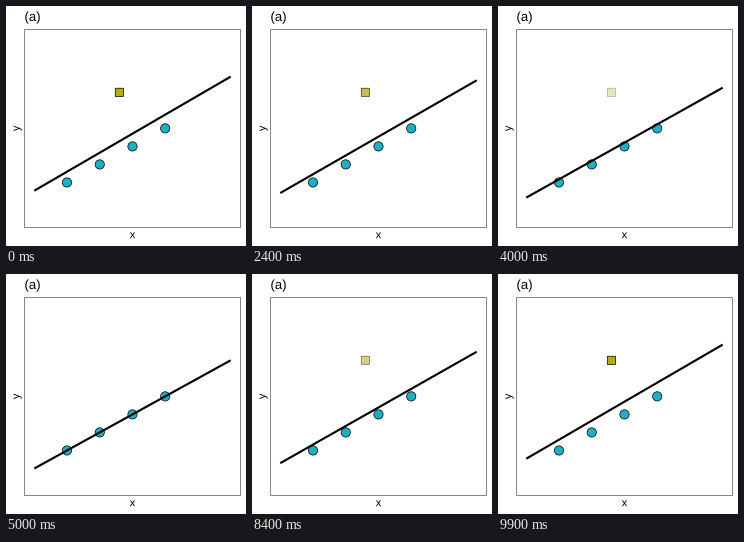
Animation of 240 by 240 pixels, one loop 10000 ms. Source, as a matplotlib script:

```python
import numpy as np
import matplotlib.pyplot as plt
from matplotlib.animation import FuncAnimation
from matplotlib.patches import Circle, PathPatch, Rectangle
from matplotlib.textpath import TextPath
from matplotlib.transforms import Affine2D

SIZE, DPI = 240, 72
FRAMES, INTERVAL = 100, 100
TEAL, OLIVE = "#1fafc3", "#aeae18"

# Data range 0..6 by 0..10 with a 5 % margin inside the panel
LEFT, TOP, RIGHT, BOTTOM = 18.45, 23.2, 234.5, 221.55
DX = (RIGHT - LEFT) / 1.1 / 6
DY = (BOTTOM - TOP) / 11


def px(x):
    return LEFT + (0.3 + x) * DX


def py(y):
    return BOTTOM - (0.5 + y) * DY


plt.rcParams["font.family"] = "Liberation Sans"
fig = plt.figure(figsize=(SIZE / DPI, SIZE / DPI), dpi=DPI, facecolor="white")
ax = fig.add_axes([0, 0, 1, 1])
ax.set_xlim(0, SIZE)
ax.set_ylim(SIZE, 0)
ax.axis("off")


def label(x, y, text, size, angle=0, center=True):
    """Draw unhinted text with its baseline through (x, y)."""
    path = TextPath((0, 0), text, size=size)
    box = path.get_extents()
    shift = -(box.x0 + box.x1) / 2 if center else 0
    place = Affine2D().translate(shift, 0).rotate_deg(angle).scale(1, -1).translate(x, y)
    ax.add_patch(PathPatch(place.transform_path(path), fc="black", lw=0, snap=False))


label(LEFT, 14.95, "(a)", 13.2, center=False)
label((LEFT + RIGHT) / 2, 232.2, "x", 11)
label(13.4, (TOP + BOTTOM) / 2, "y", 11, angle=90)

ax.add_patch(Rectangle((18.5, 23.5), 216, 198, fill=False, ec="#868686",
                       lw=1, snap=False))

# Points on a straight line, plus one outlier
xs = np.arange(1, 5)
ys = xs + 1
out_x, out_y = 2.6, 7

for x, y in zip(xs, ys):
    ax.add_patch(Circle((px(x), py(y)), 4.62, fc=TEAL, ec="black", lw=0.71))

side = 8.18
square = Rectangle((px(out_x) - side / 2, py(out_y) - side / 2), side, side,
                   fc=OLIVE, ec="black", lw=0.71, snap=False)
ax.add_patch(square)

# Least-squares fits with and without the outlier
ends = np.array([0, 6])
fit_all = np.polyval(np.polyfit(np.append(xs, out_x), np.append(ys, out_y), 1), ends)
fit_clean = np.polyval(np.polyfit(xs, ys, 1), ends)
line, = ax.plot(px(ends), py(fit_all), color="black", lw=2.13,
                solid_capstyle="butt")


def update(i):
    # Influence of the outlier: hold, fade out, hold, fade in
    weight = np.interp(i, [16, 50, 66, 99], [1, 0, 0, 1])
    line.set_ydata(py(fit_clean + weight * (fit_all - fit_clean)))
    square.set_alpha(weight)
    return line, square


anim = FuncAnimation(fig, update, frames=FRAMES, interval=INTERVAL,
                     repeat=True, repeat_delay=0)
plt.show()
```
